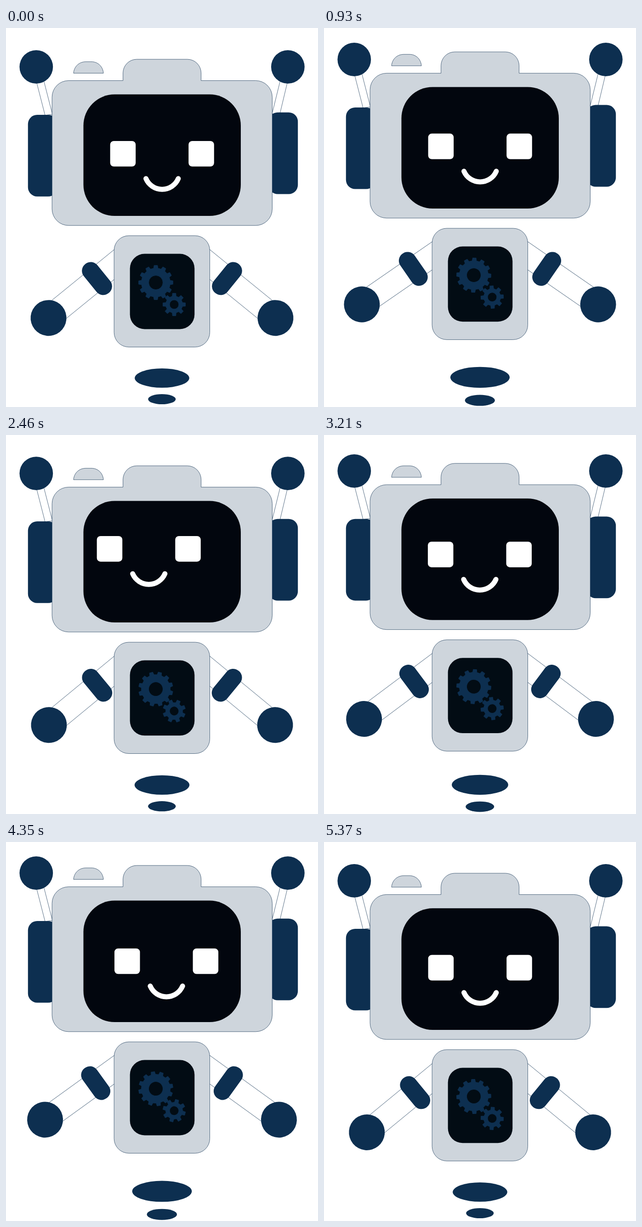
Animation of 679 by 825 pixels, one loop 5400 ms. Source, as an HTML page:

```html
<!DOCTYPE html>
<html lang="en">
<head>
<meta charset="utf-8">
<title>Floating robot</title>
<style>
  html, body { margin: 0; width: 100%; height: 100%; overflow: hidden; background: #fff; }
  svg { display: block; width: 100vw; height: 100vh; }
  .navy { fill: #0d2f50; }
  .shell { fill: #ced5dc; stroke: #0d2f50; stroke-width: .7; }
  .tube { fill: #fff; stroke: #0d2f50; stroke-width: .7; }
  .white { fill: #fff; }
  .screen { fill: #02060e; }
  .chest { fill: #020c14; }
  .mouth { fill: none; stroke: #fff; stroke-width: 11; stroke-linecap: round; }
</style>
</head>
<body>
<svg viewBox="0 0 679 825">
  <defs>
    <g id="arm">
      <rect class="tube" x="-215" y="-25.2" width="215" height="50.4"/>
      <rect class="navy" x="-98" y="-40.5" width="38" height="81" rx="18.5"/>
      <circle class="navy" cx="-215" r="39"/>
    </g>
  </defs>

  <g id="shadow">
    <ellipse class="navy" cx="339.5" cy="762" rx="59.3" ry="21"/>
    <ellipse class="navy" cx="339.3" cy="808" rx="30" ry="11"/>
  </g>

  <g id="robot">
    <g id="armLeft"><use href="#arm"/></g>
    <g transform="translate(679 0) scale(-1 1)"><g id="armRight"><use href="#arm"/></g></g>

    <rect class="shell" x="235.2" y="452.2" width="208.3" height="242.4" rx="32"/>
    <rect class="chest" x="269.7" y="491.7" width="140.6" height="163.8" rx="32"/>
    <g id="bigGear"></g>
    <g id="smallGear"></g>

    <path class="tube" d="M67 120 85 190 101 188 82 114Z"/>
    <path class="tube" d="M612 120 596 187 579 187 597 114Z"/>
    <circle class="navy" cx="65.8" cy="84.7" r="36.4"/>
    <circle class="navy" cx="613.4" cy="84.7" r="36.4"/>
    <rect class="navy" x="47.8" y="189.2" width="64" height="177.6" rx="20"/>
    <rect class="navy" x="571.2" y="183.8" width="64" height="177.8" rx="20"/>

    <path class="shell" d="M147 98.5C148 84 159 73.5 174 73.5H186C200 73.5 211 84 212 98.5Z"/>
    <path class="shell" d="M136.2 114.6H254.6V98A30 30 0 0 1 284.6 68.2H394.6A30 30 0 0 1 424.6 98V114.6H543.4
      A36 36 0 0 1 579.4 150.6V394A36 36 0 0 1 543.4 430H136.2A36 36 0 0 1 100.2 394V150.6A36 36 0 0 1 136.2 114.6Z"/>
    <rect class="screen" x="168.5" y="144.6" width="342.5" height="264.6" rx="68"/>
    <g id="face">
      <rect class="white" x="226.7" y="246" width="55.5" height="55.7" rx="8"/>
      <rect class="white" x="397.3" y="246" width="55.5" height="55.7" rx="8"/>
      <path class="mouth" d="M304.6 328A38.2 38.2 0 0 0 374.9 328"/>
    </g>
  </g>
</svg>
<script>
const LOOP = 5400, STEP = 30;
const el = id => document.getElementById(id);
const place = (id, transform) => el(id).setAttribute('transform', transform);

// Each track is a list of [step, value], eased between neighbours.
const LIFT = [[-2, 0], [42, 1], [89, 0], [135.5, 1], [182, 0]];
const SWING = [[-7, 0], [35, 1], [82.5, 0], [129, 1], [176, 0], [222, 1]];
const LOOK_X = [[34, 0], [58, -29], [94, -29], [118, 21.3], [132, 21.3], [156, 0]];
const LOOK_Y = [[34, 0], [58, -24.9], [94, -24.9], [118, 6.3], [132, 6.3], [156, 0]];

function sample(track, n) {
  if (n <= track[0][0]) return track[0][1];
  for (let i = 1; i < track.length; i++) {
    const [a, from] = track[i - 1], [b, to] = track[i];
    if (n <= b) {
      const s = (n - a) / (b - a);
      return from + (to - from) * s * s * (3 - 2 * s);
    }
  }
  return track[track.length - 1][1];
}

// Toothed ring around the origin; the hole is cut by the even-odd rule.
function makeGear(id, teeth, root, tip, hole) {
  const pitch = 2 * Math.PI / teeth;
  const points = [];
  for (let i = 0; i < teeth; i++) {
    for (const [offset, r] of [[-.29, root], [-.19, tip], [.19, tip], [.29, root]]) {
      const a = (i + offset) * pitch - Math.PI / 2;
      points.push((r * Math.cos(a)).toFixed(2) + ' ' + (r * Math.sin(a)).toFixed(2));
    }
  }
  const ring = `M${hole} 0A${hole} ${hole} 0 1 0 ${-hole} 0A${hole} ${hole} 0 1 0 ${hole} 0Z`;
  el(id).innerHTML = `<path class="navy" fill-rule="evenodd" stroke="#0d2f50" stroke-linejoin="round" d="M${points.join('L')}Z${ring}"/>`;
}

function draw(ms) {
  const n = Math.floor((ms % LOOP) / STEP);
  const lift = sample(LIFT, n);
  const angle = -39.5 + 4.98 * sample(SWING, n);
  const arm = `translate(259.3 495.6) rotate(${angle})`;
  const turn = n * STEP / LOOP * 360;

  place('robot', `translate(0 ${-19.2 * lift})`);
  place('shadow', `translate(339.5 779) scale(${1 + .105 * lift}) translate(-339.5 -779)`);
  place('armLeft', arm);
  place('armRight', arm);
  place('face', `translate(${sample(LOOK_X, n)} ${sample(LOOK_Y, n)})`);
  place('bigGear', `translate(326 554.2) rotate(${turn})`);
  place('smallGear', `translate(366 602) rotate(${-1.5 * turn})`);
}

makeGear('bigGear', 12, 31.5, 37.5, 15.5);
makeGear('smallGear', 8, 18.5, 24.8, 10);

const start = performance.now();
function tick() {
  draw(performance.now() - start);
  requestAnimationFrame(tick);
}
tick();
</script>
</body>
</html>
```
